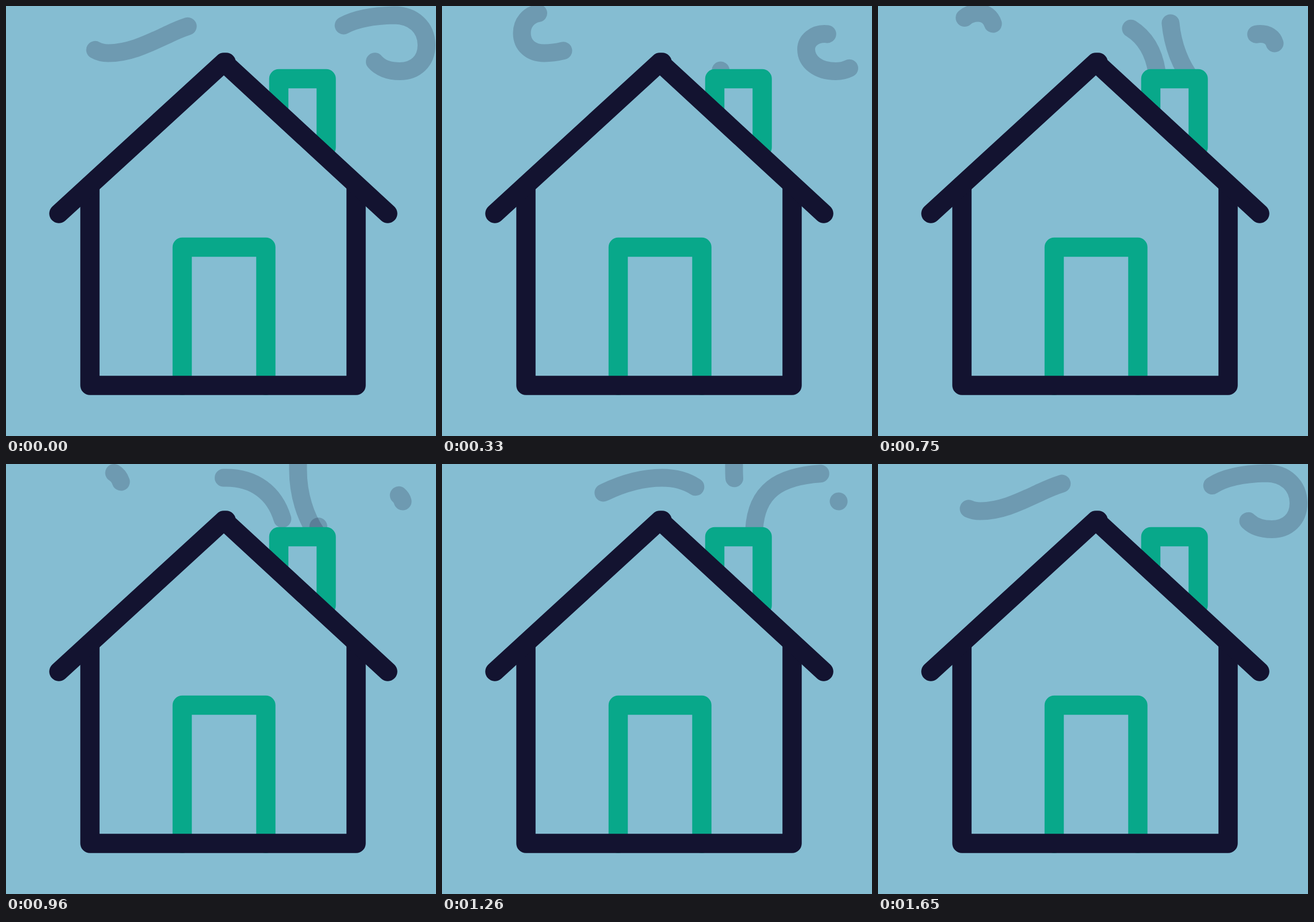
Animation, 748 px wide and 748 px high, one loop 1680 ms. Source, as an HTML page without scripts:

```html
<!DOCTYPE html>
<html lang="en">
<head>
<meta charset="utf-8">
<title>House with smoke</title>
<style>
  @property --head { syntax: "<length>"; inherits: false; initial-value: 0px; }
  @property --tail { syntax: "<length>"; inherits: false; initial-value: 0px; }

  html, body { margin: 0; height: 100%; overflow: hidden; background: #85bdd2; }
  svg { display: block; width: 100%; height: 100%; }
  path { fill: none; stroke-linecap: round; stroke-linejoin: round; }
  .house { stroke: #131330; stroke-width: 33.5; }
  .trim { stroke: #08a88a; stroke-width: 33.5; }

  /* Each puff is one dash running from --tail to --head along its path. */
  .puff {
    stroke: #131330;
    stroke-opacity: .2;
    stroke-width: 31;
    stroke-dasharray: calc(var(--head) - var(--tail)) 9999px;
    stroke-dashoffset: calc(-1 * var(--tail));
    animation: 3.36s linear infinite;
  }
  .left { animation-name: left-head, left-tail; }
  .right { animation-name: right-head, right-tail; }
  .up { animation-name: up-head, up-tail; animation-duration: 1.68s; }
  /* Puffs outlive one loop, so a twin runs one loop ahead. */
  .twin { animation-delay: -1.68s; }

  @keyframes left-head {
    0%, 3.27% { --head: 0px; animation-timing-function: cubic-bezier(.333, 0, .667, .609); }
    49.107% { --head: 397px; }
    50% { --head: 400px; animation-timing-function: cubic-bezier(.333, .577, .667, 1); }
    71.43%, 100% { --head: 525px; }
  }
  @keyframes left-tail {
    0%, 18.63% { --tail: 0px; animation-timing-function: cubic-bezier(.333, 0, .667, .478); }
    49.107% { --tail: 225.7px; }
    50% { --tail: 229.1px; animation-timing-function: cubic-bezier(.333, .478, .667, 1); }
    86.49%, 100% { --tail: 525px; visibility: hidden; }
  }
  @keyframes right-head {
    0%, 23.81% { --head: 0px; animation-timing-function: cubic-bezier(.464, 0, .498, .63); }
    49.107% { --head: 399.8px; }
    50% { --head: 403.2px; animation-timing-function: cubic-bezier(.226, .587, .537, 1); }
    73.21%, 100% { --head: 504.5px; }
  }
  @keyframes right-tail {
    0%, 38.69% { --tail: 0px; animation-timing-function: cubic-bezier(.456, 0, .741, .412); }
    49.107% { --tail: 100.4px; }
    50% { --tail: 106.9px; animation-timing-function: cubic-bezier(.173, .372, .311, 1); }
    88.1%, 100% { --tail: 504.5px; visibility: hidden; }
  }
  @keyframes up-head {
    0%, 20.24% { --head: 0px; animation-timing-function: cubic-bezier(.333, 0, .667, .333); }
    54.76%, 100% { --head: 209px; }
  }
  @keyframes up-tail {
    0%, 50% { --tail: 0px; animation-timing-function: cubic-bezier(.333, 0, .667, .333); }
    84.52%, 100% { --tail: 209px; visibility: hidden; }
  }
</style>
</head>
<body>
<svg viewBox="0 0 748 748">
  <defs>
    <path id="left" pathLength="525" d="M487 126L485 114C476 57 438 24 383 24C343 24 310 36 283 49
      C252 63 217 82 178 82C154 82 139 68 139 47C139 27 154 12 174 12C187 12 196 19 200 31"/>
    <path id="right" pathLength="504.5" d="M543 126V114C547 42 592 18 675 16C709 16 731.5 38 731.5 68
      C731.5 96 712 113.5 685 113.5C654 113.5 633.5 97 633.5 75C633.5 60 648 48.5 665 48.5C677 48.5 687 54 690 65"/>
  </defs>

  <use href="#left" class="puff left"/>
  <use href="#left" class="puff left twin"/>
  <path class="puff up" d="M545 127C524 100 508 58 508 10V-80"/>
  <use href="#right" class="puff right"/>
  <use href="#right" class="puff right twin"/>

  <path class="trim" d="M474.5 182V126.5H557V246"/>
  <path class="trim" d="M306.5 660V419.5H452V660"/>
  <path class="house" d="M146 312V660H609V312"/>
  <path class="house" d="M92 361L379 98L664 361M379 98H383"/>
</svg>
</body>
</html>
```
